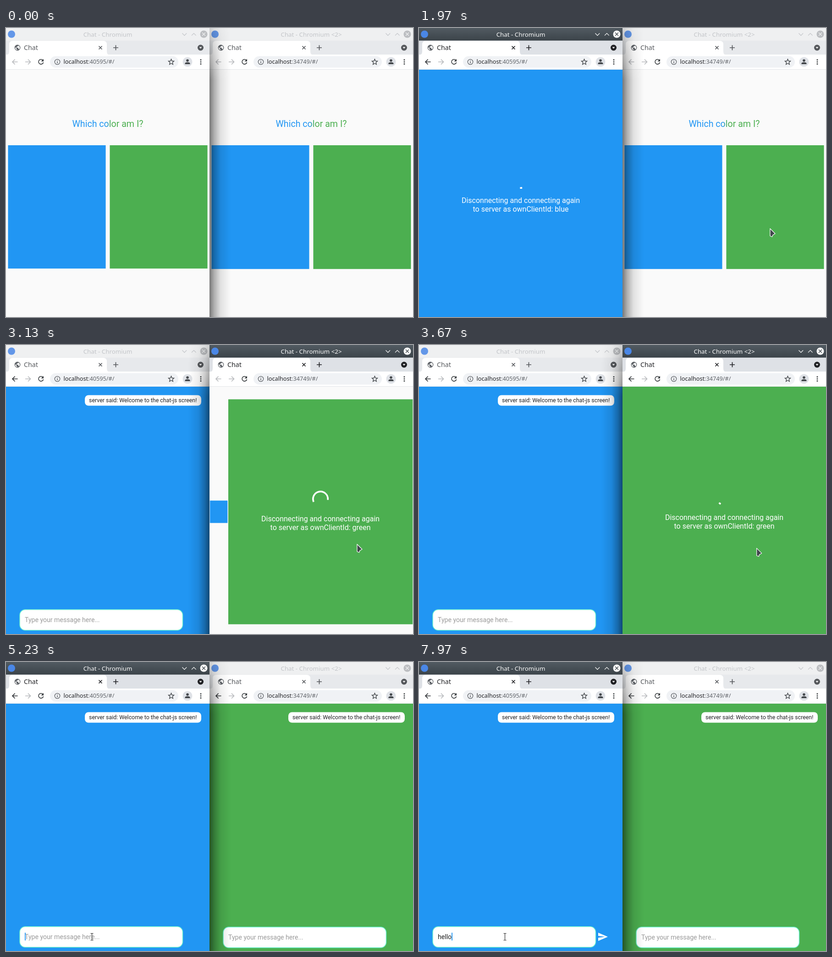
Write an HTML page that moves like this. It is 888 px wide and 631 px high and loops after 8 s.

```html
<!DOCTYPE html>
<html lang="en">
<head>
<meta charset="utf-8">
<title>Chat</title>
<style>
html, body { margin: 0; width: 100%; height: 100%; overflow: hidden; background: #fff; }
svg { display: block; width: 888px; height: 631px; }
text { white-space: pre; }
.ui { font-family: "Noto Sans", sans-serif; }
.app { font-family: Roboto, sans-serif; }
.mid { text-anchor: middle; }
.line { fill: none; stroke-width: 1.7; }
</style>
</head>
<body>
<svg id="stage" viewBox="0 0 888 631" xmlns="http://www.w3.org/2000/svg">
  <defs>
    <clipPath id="win"><rect width="444" height="631"/></clipPath>
    <linearGradient id="bar" x1="0" y1="0" x2="0" y2="1">
      <stop offset="0" stop-color="#525b62"/><stop offset="1" stop-color="#3b4349"/>
    </linearGradient>
    <linearGradient id="duo">
      <stop offset=".48" stop-color="#2196f3"/><stop offset=".54" stop-color="#4caf50"/>
    </linearGradient>
    <linearGradient id="fall">
      <stop offset="0" stop-opacity=".52"/><stop offset=".22" stop-opacity=".3"/>
      <stop offset=".52" stop-opacity=".1"/><stop offset="1" stop-opacity="0"/>
    </linearGradient>
    <linearGradient id="rise" x1="0" y1="0" x2="0" y2="1">
      <stop offset="0" stop-color="#fff" stop-opacity=".25"/><stop offset=".18" stop-color="#fff"/>
    </linearGradient>
    <mask id="soft"><rect width="46" height="631" fill="url(#rise)"/></mask>
    <g id="shade"><rect width="46" height="631" fill="url(#fall)" mask="url(#soft)"/></g>
  </defs>
</svg>
<script>
const LOOP = 8000;
const BLUE = '#2196f3', GREEN = '#4caf50', INK = '#202124', GREY = '#5f6368';
const stage = document.getElementById('stage');
const clamp = v => Math.max(0, Math.min(1, v));
const lerp = (a, b, k) => a + (b - a) * k;
const smooth = k => k * k * (3 - 2 * k);
const ramp = (t, start, length) => clamp((t - start) / length);
const set = (el, attrs) => { for (const k in attrs) el.setAttribute(k, attrs[k]); };
const show = (el, on) => set(el, { opacity: +on });

// Title bar and tab strip, drawn once per focus state.
function frame(title, active) {
  const ink = active ? '#fcfcfc' : '#c3c5c9';
  const tabInk = active ? INK : '#55585c';
  return `
    <rect width="444" height="28" fill="${active ? 'url(#bar)' : '#eff0f1'}"/>
    <rect y="27.5" width="444" height="31" fill="${active ? '#dee1e6' : '#e7e9ec'}"/>
    <circle cx="12" cy="13.5" r="8" fill="#4a87e6" opacity="${active ? 1 : .85}"/>
    <text class="ui mid" x="222" y="18.5" font-size="13.33" fill="${ink}">${title}</text>
    <path d="M384.5 11.5l4.8 4.8 4.8-4.8M405 16.3l4.8-4.8 4.8 4.8" class="line" style="stroke-width:1.2" stroke="${ink}"/>
    <circle cx="431.5" cy="13.5" r="8" fill="${active ? '#fcfcfc' : '#bcbec1'}"/>
    <path d="M428 10l7 7m0-7l-7 7" class="line" style="stroke-width:1.3" stroke="${active ? '#3b4349' : '#eff0f1'}"/>
    <path d="M0 59Q7 59 7 51V36Q7 28 15 28H212Q220 28 220 36V51Q220 59 227 59Z" fill="#fff"/>
    <path transform="translate(17.3 35.3) scale(.64)" fill="${GREY}" d="M12 2a10 10 0 1 0 0 20 10 10 0 0 0 0-20zm-1 17.9c-4-.5-7-3.800-7-7.900 0-.6.1-1.200.2-1.800L9 15v1c0 1.100.9 2 2 2zm6.900-2.500c-.3-.8-1-1.400-1.900-1.400h-1v-3c0-.6-.4-1-1-1H8v-2h2c.6 0 1-.4 1-1V7h2c1.100 0 2-.9 2-2v-.4c2.900 1.200 5 4.100 5 7.400 0 2.100-.8 4-2.100 5.400z"/>
    <text class="ui" x="39" y="48" font-size="14.2" fill="${tabInk}">Chat</text>
    <path d="M202.5 39.5l7 7m0-7l-7 7M234 43h11m-5.5-5.5v11" class="line" stroke="${tabInk}"/>
    <circle cx="424.5" cy="43" r="6.5" fill="${tabInk}"/>
    <path d="M421.5 41.5h6l-3 3.5z" fill="#fff"/>`;
}

function toolbar(port) {
  return `
    <rect y="58" width="444" height="33" fill="#fff"/>
    <rect y="90" width="444" height="1" fill="#e3e5e8"/>
    <path data-id="back" d="M25.5 74H14m5.5-5.5L14 74l5.5 5.5" class="line"/>
    <path d="M42 74h11.5m-5.5-5.5l5.5 5.5-5.5 5.5" class="line" stroke="#b9bbbe"/>
    <path d="M80.5 70.5A5.3 5.3 0 1 0 81.5 75" class="line" stroke="#3c4043"/>
    <path d="M82 67.5v5.5h-5.5z" fill="#3c4043"/>
    <rect x="96" y="61.5" width="280" height="25" rx="12.5" fill="#f0f2f5"/>
    <circle cx="112" cy="74" r="5.7" class="line" style="stroke-width:1.3" stroke="${GREY}"/>
    <path d="M112 73v4m0-6.5v1.2" class="line" style="stroke-width:1.5" stroke="${GREY}"/>
    <text class="ui" x="125.5" y="78.3" font-size="12.7" fill="${INK}">localhost<tspan fill="${GREY}">:${port}/#/</tspan></text>
    <path d="M360.5 68l1.7 4 4.3.4-3.3 2.8 1 4.3-3.7-2.3-3.7 2.3 1-4.3-3.3-2.8 4.3-.4z" class="line" style="stroke-width:1.4" stroke="#45494d"/>
    <circle cx="396" cy="74" r="10.5" fill="#dfe2e7"/>
    <circle cx="396" cy="71" r="2.8" fill="#45494d"/>
    <path d="M390.5 79v-1.5q0-2.7 5.5-2.7t5.5 2.7V79z" fill="#45494d"/>
    ${[69.5, 74, 78.5].map(y => `<circle cx="425" cy="${y}" r="1.5" fill="#3c4043"/>`).join('')}`;
}

function makeWindow(cfg) {
  const root = document.createElementNS(stage.namespaceURI, 'g');
  set(root, { transform: `translate(${cfg.x} 0)`, 'clip-path': 'url(#win)' });
  root.innerHTML = `
    <rect width="444" height="631" fill="#fafafa"/>
    <text data-id="ask" class="app mid" x="222" font-size="19.6" fill="url(#duo)">Which color am I?</text>
    <rect data-id="blue" fill="${BLUE}"/>
    <rect data-id="green" fill="${GREEN}"/>
    <g data-id="wait" class="app mid" fill="#fff" font-size="16">
      <path data-id="spin" fill="none" stroke="#fff" stroke-width="3.6" stroke-linecap="square"/>
      <text data-id="row0"></text><text data-id="row1"></text><text data-id="row2"></text>
    </g>
    <g data-id="chat" class="app">
      <rect x="172" y="109.5" width="254" height="23" rx="8" fill="#fff"/>
      <text x="181" y="125.3" font-size="12.4" fill="${INK}">server said: Welcome to the chat-js screen!</text>
      <g transform="translate(0 ${cfg.drop})" font-size="14.1">
        <rect data-id="field" x="30" y="577.8" width="355.5" height="45" rx="12" stroke="#6df2d0" stroke-width="1.5"/>
        <text data-id="hint" x="41" y="604.8" fill="#9a9a9a">Type your message here...</text>
        <text data-id="typed" x="41" y="604.8" fill="#212121"></text>
        <rect data-id="caret" y="591" width="1.8" height="17" fill="${BLUE}"/>
        <path data-id="send" transform="translate(389 588)" d="M2 21L23 12 2 3v7l15 2-15 2z" fill="#fff"/>
      </g>
    </g>
    <g>${frame(cfg.title, false)}</g>
    <g data-id="focus">${frame(cfg.title, true)}</g>
    ${toolbar(cfg.port)}`;
  stage.append(root);
  const el = {};
  root.querySelectorAll('[data-id]').forEach(n => el[n.dataset.id] = n);
  return { ...cfg, el };
}

const wins = [
  makeWindow({ x: 0, title: 'Chat - Chromium', port: 40595, pick: 'blue', click: 745, drop: 0 }),
  makeWindow({ x: 444, title: 'Chat - Chromium &lt;2&gt;', port: 34749, pick: 'green', click: 2290, drop: 1 })
];
stage.insertAdjacentHTML('beforeend', `
  <use id="shadeR" href="#shade" x="444"/>
  <use id="shadeL" href="#shade" transform="translate(444 0) scale(-1 1)"/>
  <path id="arrow" d="M0 0V16L4.5 18 6 14 11 11Z" fill="#40464b" stroke="#fff" stroke-width="1.2" stroke-linejoin="round"/>
  <path id="beam" d="M-3-7.5h2.2l.8.8.8-.8H3M0-6.7V6.7M-3 7.5h2.2l.8-.8.8.8H3" fill="none" stroke="#333" stroke-width="1.2"/>`);
const [shadeR, shadeL, arrow, beam] =
  ['shadeR', 'shadeL', 'arrow', 'beam'].map(id => document.getElementById(id));

// cubic-bezier(.4, 0, .2, 1)
function fastOutSlowIn(x) {
  let lo = 0, hi = 1;
  for (let i = 0; i < 20; i++) {
    const s = (lo + hi) / 2, r = 1 - s;
    if (1.2 * r * r * s + .6 * r * s * s + s * s * s < x) lo = s; else hi = s;
  }
  return lo * lo * (3 - 2 * lo);
}

function spinnerPath(ms, cx, cy) {
  const R = 16.2, path = ms / 1333 % 1;
  const head = fastOutSlowIn(clamp(path * 2));
  const tail = fastOutSlowIn(clamp(path * 2 - 1));
  const from = (-102 + tail * 270 + ms / 2222 * 360 + path * 90) * Math.PI / 180;
  const sweep = Math.max((head - tail) * 1.5 * Math.PI, .02);
  const at = a => `${cx + R * Math.cos(a)} ${cy + R * Math.sin(a)}`;
  return `M${at(from)}A${R} ${R} 0 ${+(sweep > Math.PI)} 1 ${at(from + sweep)}`;
}

function drawPage(w, t) {
  const { el, pick } = w, ms = t - w.click;
  const p = ramp(ms, 22, 1000), q = 1 - p;
  const tall = 269.2 + w.drop;
  const cy = 390.6 + w.drop * q / 2 - 29.6 * smooth(p) ** 1.2;
  const pad = 4.44 * q, big = lerp(213.1, 444, p), small = 213.1 * q;
  const bigX = pick === 'blue' ? pad : 444 - pad - big;
  const smallX = pick === 'blue' ? 444 - pad - small : pad;
  const place = (node, x, width, h) => set(node, { x, width, y: cy - h / 2, height: h });
  place(el[pick], bigX, big, lerp(tall, 540, p));
  place(el[pick === 'blue' ? 'green' : 'blue'], smallX, small, tall * q);
  set(el.ask, { y: 215.5 - 115 * p, opacity: clamp(1 - 1.7 * p) });
  set(el.back, { stroke: p === 1 ? '#303337' : '#b9bbbe' });

  const ready = ramp(ms, 2000, 150);
  show(el.chat, ready);
  set(el.wait, { opacity: ms < 0 ? 0 : ramp(ms, 0, 120) * (1 - ready) });
  if (ms >= 0) {
    const cx = bigX + big / 2, narrow = big < 272;
    const rows = narrow
      ? ['Disconnecting and', 'connecting again to server', `as ownClientId: ${pick}`]
      : ['Disconnecting and connecting again', `to server as ownClientId: ${pick}`, ''];
    const top = cy - (narrow ? 9.4 : 0);
    rows.forEach((s, i) => {
      el['row' + i].textContent = s;
      set(el['row' + i], { x: cx, y: top + 21.3 + 18.75 * i });
    });
    set(el.spin, { d: spinnerPath(ms, cx, top - 28) });
  }
}

const FOCUS = 4960, KEYS = [6260, 6710, 6780, 6860, 6950];

function drawField(w, t, hover) {
  const { el } = w, left = w.x === 0;
  const count = left ? KEYS.filter(k => t >= k).length : 0;
  el.typed.textContent = 'hello'.slice(0, count);
  show(el.hint, !count);
  show(el.send, count > 0);
  const since = t - (count ? KEYS[count - 1] : FOCUS);
  const blink = left && since >= 0 && since % 1000 < 500;
  set(el.caret, { x: 41 + (count ? el.typed.getComputedTextLength() : 0), opacity: +blink });
  set(el.field, { fill: left && hover && t < FOCUS ? '#f5f5f5' : '#fff' });
}

// time, x, y
const TRAIL = [
  [80, 888, 612], [600, 103.5, 402], [1180, 103.5, 402], [1640, 810, 446],
  [1900, 766, 438], [2200, 766, 438], [2300, 766, 435], [3550, 766, 435],
  [4400, 233, 593], [4600, 233, 593], [4880, 187.5, 600], [LOOP, 187.5, 600]
];

function pointer(t) {
  const i = TRAIL.findIndex(k => k[0] > t);
  if (i < 1) return null;
  const [a, b] = [TRAIL[i - 1], TRAIL[i]];
  const k = smooth(ramp(t, a[0], b[0] - a[0]));
  return [lerp(a[1], b[1], k), lerp(a[2], b[2], k)];
}

function draw(t) {
  const at = pointer(t);
  const inField = !!at && t > 3550 && at[0] > 30 && at[0] < 385 && at[1] > 578;
  show(arrow, at && !inField);
  show(beam, inField);
  if (at) [arrow, beam].forEach(n => set(n, { transform: `translate(${at})` }));

  const toLeft = ramp(t, 650, 150), toRight = ramp(t, 2200, 150), again = ramp(t, FOCUS, 150);
  const right = toRight * (1 - again);
  show(wins[0].el.focus, toLeft * (1 - toRight) + again);
  show(wins[1].el.focus, right);
  const rightOnTop = t >= 2200 && t < FOCUS;
  show(shadeL, rightOnTop);
  show(shadeR, !rightOnTop);

  wins.forEach(w => { drawPage(w, t); drawField(w, t, inField); });
}

const begin = performance.now();
function tick() {
  draw((performance.now() - begin) % LOOP);
  requestAnimationFrame(tick);
}
tick();
</script>
</body>
</html>
```
